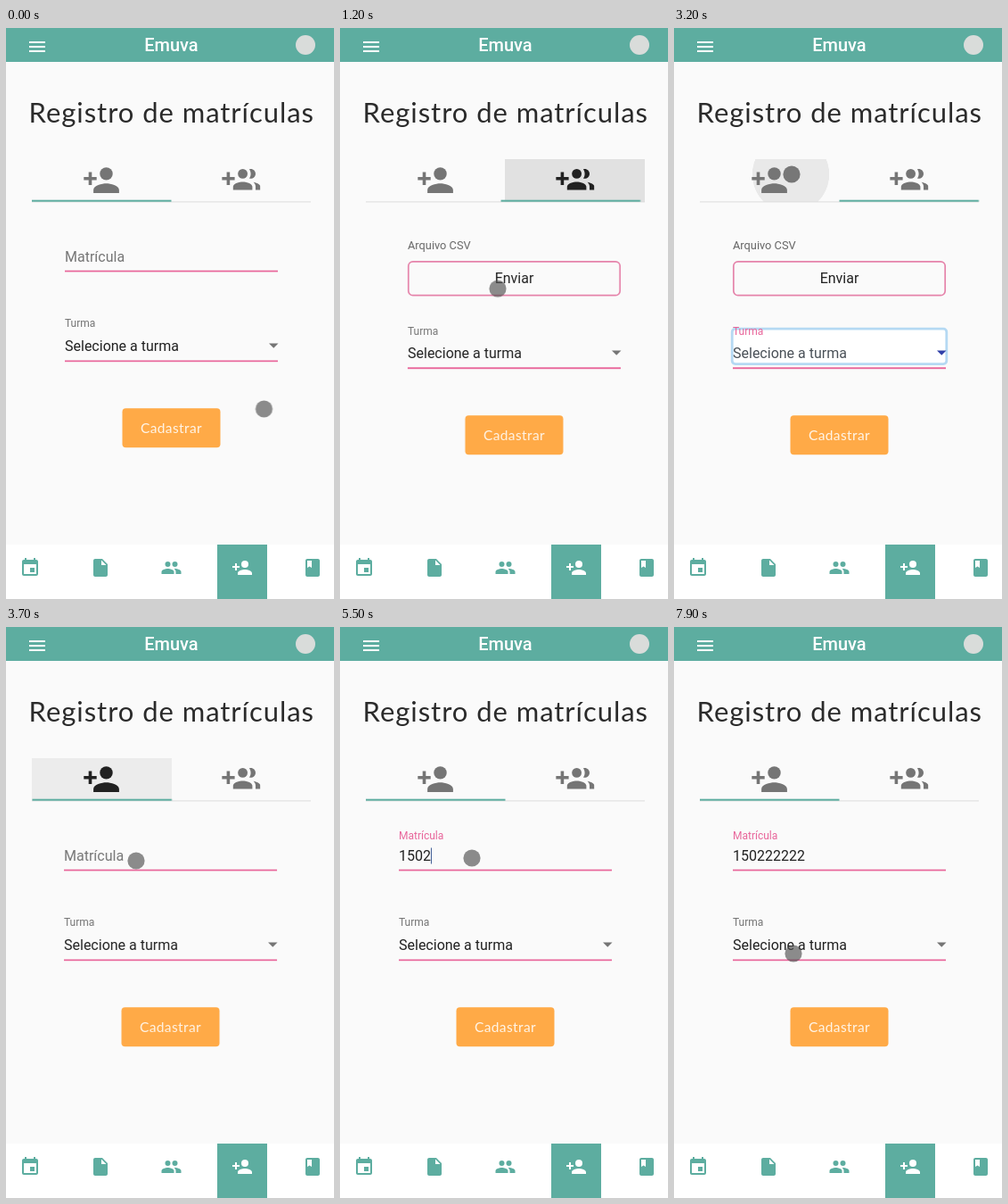
An HTML page that plays this animation: 368 by 640 pixels, repeating every 8000 ms.

```html
<!DOCTYPE html>
<html lang="pt">
<head>
<meta charset="utf-8">
<title>Registro de matrículas</title>
<style>
  :root { --teal: #5dada0; --pink: #e8659a; --ink: #212121; --soft: #757575; --page: #fafafa; }
  html, body { margin: 0; width: 100%; height: 100%; overflow: hidden; background: var(--page); }
  svg { display: block; }
  text { font: 16px Roboto, sans-serif; fill: var(--ink); }
  .mid { text-anchor: middle; }
  .brand { font-size: 20px; font-weight: 500; fill: #fff; }
  .heading { font: 31px Lato, sans-serif; letter-spacing: .95px; fill: #2b2b2b; }
  .action { font: 15.5px Lato, sans-serif; letter-spacing: .4px; fill: #fff4e6; }
  .small { font-size: 12px; fill: var(--soft); }
  .file { font-size: 12.8px; fill: #666; }
  .line { fill: var(--pink); }
  .arrow { fill: var(--soft); }
  .nav { fill: var(--teal); }

  /* every animation shares one 8 s clock */
  .slide, .ink, .ripple, .touch, .float, .halo { animation: 8s linear infinite; }
  .tab1, .tab2, .typed, .caret, .focus-label, .focus-text, .focus-arrow { animation: 8s step-end infinite; }

  .slide { --to: -313px; animation-name: slide; }
  .ink { --to: 156.5px; animation-name: slide; }
  @keyframes slide {
    0% { transform: translateX(0); }
    10.09% { transform: translateX(0); animation-timing-function: cubic-bezier(.35, 0, .25, 1); }
    16.34% { transform: translateX(var(--to)); }
    40.45% { transform: translateX(var(--to)); animation-timing-function: cubic-bezier(.35, 0, .25, 1); }
    46.7%, 100% { transform: translateX(0); }
  }

  .tab1 { fill: var(--soft); animation-name: tab1; }
  @keyframes tab1 { 40.45% { fill: var(--ink); } 48.4% { fill: var(--soft); } }
  .tab2 { fill: var(--soft); animation-name: tab2; }
  @keyframes tab2 { 10% { fill: var(--ink); } 27.6% { fill: var(--soft); } }

  .r1 { animation-name: grow1, fade1; }
  @keyframes grow1 {
    0%, 9.5% { transform: scale(0); animation-timing-function: cubic-bezier(0, 0, .2, 1); }
    15.1%, 100% { transform: none; }
  }
  @keyframes fade1 { 0%, 9.5% { opacity: 0; } 10.8%, 15.6% { opacity: .1; } 20.1%, 100% { opacity: 0; } }
  .r2 { animation-name: grow2, fade2; }
  @keyframes grow2 {
    0%, 39.19% { transform: scale(0); animation-timing-function: cubic-bezier(0, 0, .2, 1); }
    44.8%, 100% { transform: none; }
  }
  @keyframes fade2 { 0%, 39.19% { opacity: 0; } 40.4%, 44.8% { opacity: .1; } 48.1%, 100% { opacity: 0; } }

  .halo { animation-name: halo; }
  @keyframes halo { 0%, 27.5% { opacity: 0; } 29.4%, 40.45% { opacity: 1; } 42.3%, 100% { opacity: 0; } }
  .focus-label { animation-name: focus-label; }
  @keyframes focus-label { 27.6% { fill: var(--pink); } 40.45% { fill: var(--soft); } }
  .focus-text { animation-name: focus-text; }
  @keyframes focus-text { 27.6% { fill: #495057; } 40.45% { fill: var(--ink); } }
  .focus-arrow { animation-name: focus-arrow; }
  @keyframes focus-arrow { 27.6% { fill: #3040a8; } 40.45% { fill: var(--soft); } }

  .float { fill: var(--soft); animation-name: float; }
  @keyframes float {
    0% { transform: translate(66px, 261.5px); fill: var(--soft); }
    48.25% { transform: translate(66px, 261.5px); fill: var(--soft); animation-timing-function: cubic-bezier(.25, .8, .25, 1); }
    53.25%, 100% { transform: translate(66px, 237.5px) scale(.75); fill: var(--pink); }
  }

  .typed { --d: 8.984px; animation-name: typed; }
  @keyframes typed {
    0% { transform: none; }
    58.25% { transform: translateX(var(--d)); }
    60.75% { transform: translateX(calc(2 * var(--d))); }
    63.25% { transform: translateX(calc(3 * var(--d))); }
    68.25% { transform: translateX(calc(4 * var(--d))); }
    70.75% { transform: translateX(calc(5 * var(--d))); }
    73.25% { transform: translateX(calc(6 * var(--d))); }
    75.75% { transform: translateX(calc(7 * var(--d))); }
    78.25% { transform: translateX(calc(8 * var(--d))); }
    80.75%, 100% { transform: translateX(calc(9 * var(--d))); }
  }
  .caret { fill: #3d5b94; animation-name: caret; }
  @keyframes caret {
    0% { opacity: 0; } 49.5% { opacity: 1; } 55.75% { opacity: 0; } 58.25% { opacity: 1; }
    86.9% { opacity: 0; } 93% { opacity: 1; } 98.25%, 100% { opacity: 0; }
  }

  .touch { fill: #505050; fill-opacity: .65; animation-name: touch; }
  @keyframes touch {
    0% { transform: translate(289.5px, 427px); }
    2.5% { transform: translate(289.5px, 427px); animation-timing-function: ease-in-out; }
    9%, 10.5% { transform: translate(257px, 172px); }
    15% { transform: translate(177px, 292px); animation-timing-function: ease-out; }
    22% { transform: translate(166px, 353px); }
    27.5% { transform: translate(166px, 353px); animation-timing-function: ease-in-out; }
    35%, 37.5% { transform: translate(136px, 142px); fill-opacity: .65; }
    39% { transform: translate(132px, 164px); fill-opacity: .75; }
    41% { transform: translate(132px, 164px); fill-opacity: .75; animation-timing-function: ease-in-out; }
    46.25%, 48.5% { transform: translate(146px, 262px); fill-opacity: .65; }
    50.5% { transform: translate(148px, 259px); }
    87.5% { transform: translate(148px, 259px); animation-timing-function: ease-in-out; }
    95.5%, 100% { transform: translate(134px, 366px); }
  }
</style>
</head>
<body>
<svg width="368" height="640" viewBox="0 0 368 640">
  <defs>
    <symbol id="menu" viewBox="0 0 24 24"><path d="M3 18h18v-2H3v2zm0-5h18v-2H3v2zm0-7v2h18V6H3z"/></symbol>
    <symbol id="event" viewBox="0 0 24 24"><path d="M17 12h-5v5h5v-5zM16 1v2H8V1H6v2H5c-1.11 0-1.99.9-1.99 2L3 19c0 1.1.89 2 2 2h14c1.1 0 2-.9 2-2V5c0-1.1-.9-2-2-2h-1V1h-2zm3 18H5V8h14v11z"/></symbol>
    <symbol id="doc" viewBox="0 0 24 24"><path d="M6 2c-1.1 0-2 .9-2 2v16c0 1.1.9 2 2 2h12c1.1 0 2-.9 2-2V8l-6-6H6zm7 7V3.5L18.5 9H13z"/></symbol>
    <symbol id="people" viewBox="0 0 24 24"><circle cx="16" cy="8" r="3"/><circle cx="8" cy="8" r="3"/><path d="M8 13c-2.33 0-7 1.17-7 3.5V19h14v-2.5c0-2.33-4.67-3.5-7-3.5zm8 0c-.29 0-.62.02-.97.05 1.16.84 1.97 1.97 1.97 3.45V19h6v-2.5c0-2.33-4.67-3.5-7-3.5z"/></symbol>
    <symbol id="add" viewBox="0 0 24 24"><circle cx="15" cy="8" r="4"/><path d="M6 10V7H4v3H1v2h3v3h2v-3h3v-2H6zm9 4c-2.67 0-8 1.34-8 4v2h16v-2c0-2.66-5.33-4-8-4z"/></symbol>
    <symbol id="add-all" viewBox="0 0 24 24"><circle cx="13" cy="8" r="3"/><path d="M8 10H5V7H3v3H0v2h3v3h2v-3h3v-2zm10 1c1.66 0 3-1.34 3-3s-1.34-3-3-3c-.32 0-.63.05-.91.14.57.81.9 1.79.9 2.86s-.34 2.04-.9 2.86c.28.09.59.14.91.14zm1.62 2.16c.83.73 1.38 1.66 1.38 2.84v2h3v-2c0-1.54-2.37-2.49-4.38-2.84zM13 13c-2 0-6 1-6 3v2h12v-2c0-2-4-3-6-3z"/></symbol>
    <symbol id="book" viewBox="0 0 24 24"><path d="M18 2H6c-1.1 0-2 .9-2 2v16c0 1.1.9 2 2 2h12c1.1 0 2-.9 2-2V4c0-1.1-.9-2-2-2zM6 4h5v8l-2.5-1.5L6 12V4z"/></symbol>
    <clipPath id="body"><rect x="29" y="197" width="313" height="360"/></clipPath>
    <clipPath id="left"><rect x="29" y="147" width="156.5" height="48"/></clipPath>
    <clipPath id="right"><rect x="185.5" y="147" width="156.5" height="48"/></clipPath>
    <g id="submit">
      <rect x="130.5" y="426.3" width="110" height="44" rx="4" fill="#ffaa47"/>
      <text class="mid action" x="185.5" y="453.5">Cadastrar</text>
    </g>
  </defs>

  <rect width="368" height="640" fill="#fafafa"/>
  <rect width="368" height="38" fill="#5dada0"/>
  <use href="#menu" x="23" y="9" width="24" height="24" fill="#fff"/>
  <text class="mid brand" x="185.5" y="26">Emuva</text>
  <circle cx="336" cy="19" r="11" fill="#d9dcda"/>

  <text class="mid heading" x="185.8" y="106">Registro de matrículas</text>

  <g clip-path="url(#left)"><g transform="translate(131 164)"><circle class="ripple r2" r="107"/></g></g>
  <g clip-path="url(#right)"><g transform="translate(257 172)"><circle class="ripple r1" r="90"/></g></g>
  <use class="tab1" href="#add" x="85.5" y="149" width="43.2" height="43.2"/>
  <use class="tab2" href="#add-all" x="242.2" y="149" width="43.2" height="43.2"/>
  <rect x="29" y="194.4" width="313" height="1" fill="#dcdcdc"/>
  <rect class="ink" x="29" y="192.7" width="156.5" height="2" fill="#5dada0"/>

  <g clip-path="url(#body)">
    <g class="slide">
      <g>
        <text x="66" y="261.5">150222222</text>
        <g class="typed">
          <rect x="66" y="246" width="90" height="22" fill="#fafafa"/>
          <rect class="caret" x="66" y="247.5" width="1" height="18"/>
        </g>
        <text class="float">Matrícula</text>
        <rect class="line" x="66" y="271.7" width="239" height="1.7"/>
        <text class="small" x="66" y="335">Turma</text>
        <text x="66" y="361.5">Selecione a turma</text>
        <path class="arrow" d="M295 353.5h10.5l-5.25 5.2z"/>
        <rect class="line" x="66" y="372.5" width="239" height="1.7"/>
        <use href="#submit"/>
      </g>
      <g transform="translate(313 0)">
        <text class="file" x="66" y="248">Arquivo CSV</text>
        <rect x="66.8" y="261.8" width="237.4" height="37.9" rx="5" fill="none" stroke="#e583aa" stroke-width="1.7"/>
        <text class="mid" x="185.5" y="285.5">Enviar</text>
        <rect class="halo" x="65.2" y="337.2" width="240.6" height="39.4" rx="3.5" fill="#fff" stroke="#b5d9f3" stroke-width="2.8"/>
        <text class="small focus-label" x="66" y="343.5">Turma</text>
        <text class="focus-text" x="66" y="369.5">Selecione a turma</text>
        <path class="arrow focus-arrow" d="M295 361.5h10.5l-5.25 5.2z"/>
        <rect class="line" x="66" y="380.3" width="239" height="1.9"/>
        <use href="#submit" y="8"/>
      </g>
    </g>
  </g>

  <rect y="579" width="368" height="61" fill="#fff"/>
  <rect x="237" y="579" width="56" height="61" fill="#5dada0"/>
  <g class="nav">
    <use href="#event" x="15" y="593" width="24" height="24"/>
    <use href="#doc" x="94" y="593" width="24" height="24"/>
    <use href="#people" x="173.5" y="593" width="24" height="24"/>
    <use href="#add" x="253" y="593" width="24" height="24" fill="#fff"/>
    <use href="#book" x="332" y="593" width="24" height="24"/>
  </g>

  <circle class="touch" r="9.6"/>
</svg>
</body>
</html>
```
